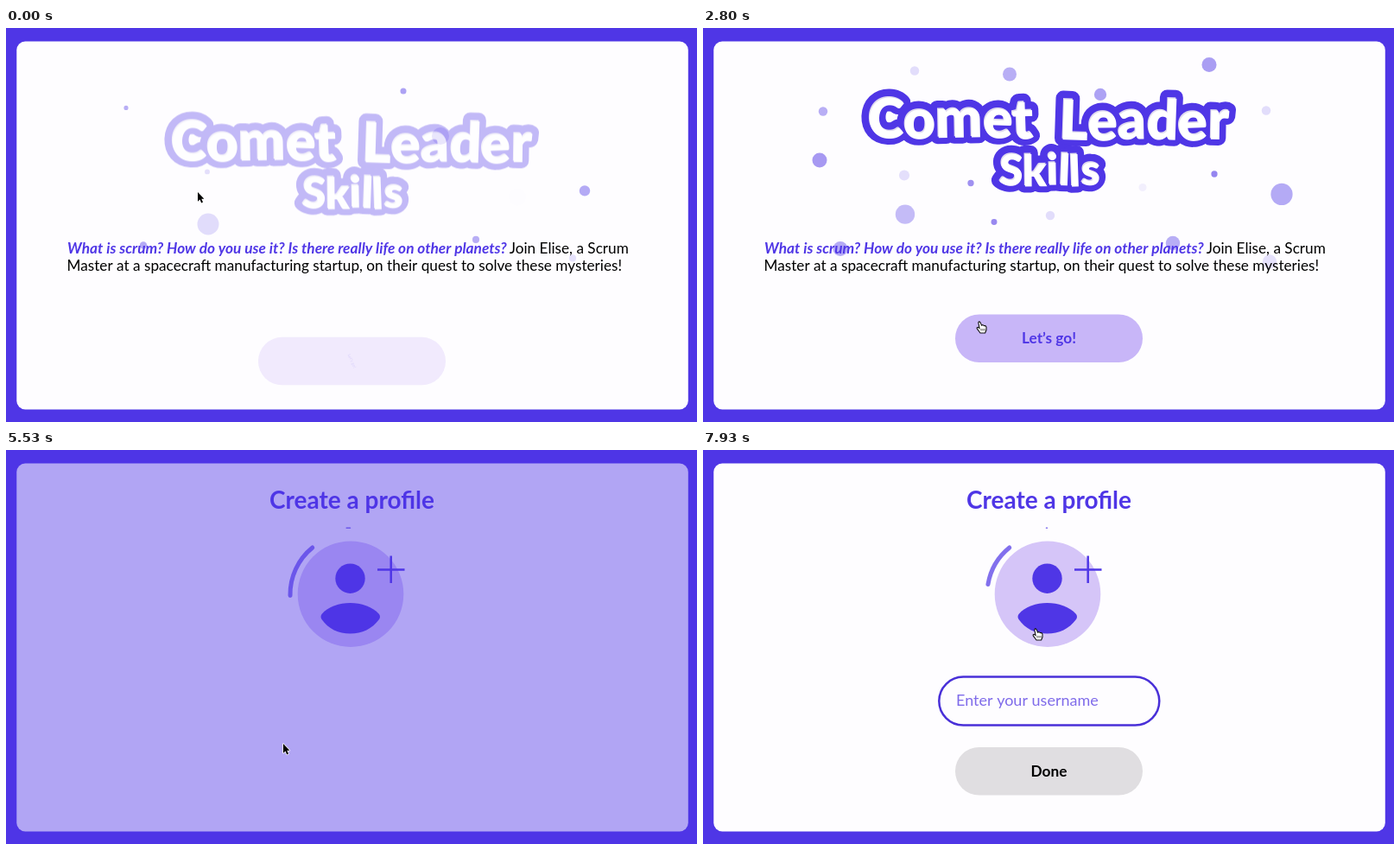
Recreate the animation shown at these times as an HTML page with a canvas. Size 800 by 456 pixels, loop 8000 ms.

```html
<!DOCTYPE html>
<html lang="en">
<head>
<meta charset="utf-8">
<title>Comet Leader Skills</title>
<style>
html, body { margin: 0; width: 100%; height: 100%; overflow: hidden; background: #4f36e6; }
canvas { display: block; width: 800px; height: 456px; }
</style>
</head>
<body>
<canvas id="stage" width="800" height="456"></canvas>
<script>
const LOOP = 8000;
const PURPLE = '#4f36e6', PAPER = '#fefdff', LILAC = '#d5c5f8';
const FONT = 'Lato, "Open Sans", sans-serif';
const ctx = document.getElementById('stage').getContext('2d');

const clamp = v => Math.min(1, Math.max(0, v));
const progress = (t, start, length) => clamp((t - start) / length);
const easeOut = p => 1 - (1 - p) ** 3;
const easeInOut = p => p * p * (3 - 2 * p);
const mix = (a, b, p) => a + (b - a) * p;
const rad = deg => deg * Math.PI / 180;

function group(draw, alpha = 1, x = 0, y = 0) {
  ctx.save();
  ctx.globalAlpha *= alpha;
  ctx.translate(x, y);
  draw();
  ctx.restore();
}

function disc(x, y, r, color) {
  ctx.fillStyle = color;
  ctx.beginPath();
  ctx.arc(x, y, Math.max(0, r), 0, Math.PI * 2);
  ctx.fill();
}

function pill(x, y, w, h, r) {
  ctx.beginPath();
  ctx.roundRect(x, y, w, h, r);
}

function write(text, x, y, style, color, align = 'left') {
  ctx.font = `${style} ${FONT}`;
  ctx.fillStyle = color;
  ctx.textAlign = align;
  ctx.fillText(text, x, y);
}

// Text that grows from nothing while turning upright around a centre.
function spinIn(cx, cy, p, draw) {
  ctx.save();
  ctx.translate(cx, cy);
  ctx.rotate(rad(90 * (1 - p)));
  ctx.scale(p, p);
  ctx.globalAlpha *= p;
  draw();
  ctx.restore();
}

function makeLogo() {
  const layer = document.createElement('canvas');
  layer.width = 800;
  layer.height = 240;
  const g = layer.getContext('2d');
  const words = [['Comet', 285, 126, 64], ['Leader', 509, 128, 64], ['Skills', 400, 181, 50]];
  const eachLetter = draw => words.forEach(([word, cx, base, size]) => {
    g.font = `900 ${size}px ${FONT}`;
    let x = cx - g.measureText(word).width / 2;
    [...word].forEach((letter, i) => {
      const w = g.measureText(letter).width;
      g.save();
      g.translate(x + w / 2, base + Math.sin(i * 2) * 1);
      g.rotate(rad(2.2 * Math.sin(i * 2.4 + 1)));
      draw(letter);
      g.restore();
      x += w;
    });
  });
  g.textAlign = 'center';
  g.lineJoin = 'round';
  g.lineWidth = 17;
  g.strokeStyle = PURPLE;
  eachLetter(c => g.strokeText(c, 0, 0));
  g.fillStyle = '#dfdaee';
  eachLetter(c => g.fillText(c, 0, 0));
  g.fillStyle = '#fff';
  eachLetter(c => g.fillText(c, 1, 1.5));
  return layer;
}
const logo = makeLogo();

// Bubbles fade in, rise and shrink. Each: x, y, radius, opacity.
const bubbleSets = [
  { phase: .9, period: 1500, full: .1, items: [
    [139, 117, 9.5, .4], [233, 191, 11, .15], [670, 213, 23, .42], [159, 276, 15.5, .42],
    [544, 269.5, 15, .4], [656, 291, 15, .14], [460, 97.5, 13, .46]] },
  { phase: 0, period: 1500, full: .2, items: [
    [245, 70, 15, .16], [355, 74, 23, .4], [586, 63, 24.5, .48], [652, 116, 15, .16],
    [135, 173.5, 24.5, .5], [310, 200, 10.5, .54], [509, 205, 13, .07], [592, 189.5, 10.5, .6],
    [402, 237.5, 15, .16], [337, 245, 10, .58], [340, 133, 10, .5]] },
  { phase: .1, period: 2045, full: .1, items: [[234, 227, 12.5, .33], [503, 125, 10, .36]] }
];

function drawBubbles(t) {
  for (const { phase, period, full, items } of bubbleSets) {
    const u = (phase + t / period) % 1;
    const rise = 24.6 * (u - full) / .8;
    for (const [x, y, r, alpha] of items) {
      group(() => disc(x, y - rise, r * (1 - u ** 3), PURPLE), alpha * clamp(u / .2));
    }
  }
}

function drawPanel() {
  ctx.fillStyle = PURPLE;
  ctx.fillRect(0, 0, 800, 456);
  ctx.fillStyle = PAPER;
  pill(12.3, 15.5, 777.5, 426, 10);
  ctx.fill();
}

function drawIntro(t) {
  drawPanel();
  drawBubbles(t);
  const enter = easeOut(progress(t, -90, 700));
  const drop = 40 * (1 - enter);
  group(() => ctx.drawImage(logo, 0, 0), enter, 0, drop);

  const lead = 'What is scrum? How do you use it? Is there really life on other planets?';
  write(lead, 71, 260.5, 'italic 700 17.3px', PURPLE);
  const next = 71 + ctx.measureText(lead).width + 3;
  write('Join Elise, a Scrum', next, 260.5, '17.2px', '#000');
  write('Master at a spacecraft manufacturing startup, on their quest to solve these mysteries!',
    70.5, 281, '17.2px', '#000');

  const hover = progress(t, 2430, 130);
  group(() => {
    ctx.fillStyle = `rgb(${mix(213, 200, hover)}, ${mix(197, 182, hover)}, 248)`;
    pill(292, 331.5, 217, 55.5, 27.7);
    ctx.fill();
    spinIn(400.5, 359, easeOut(progress(t, -70, 700)), () =>
      write('Let’s go!', 0, 6, '700 17.3px', PURPLE, 'center'));
  }, enter, 0, drop);
}

function drawRing(age) {
  if (age < 0) return;
  const arc = (r, from, lead, tail) => {
    if (lead <= tail) return;
    ctx.beginPath();
    ctx.arc(398.5, 167, r, rad(from - tail), rad(from - lead), true);
    ctx.stroke();
  };
  ctx.strokeStyle = PURPLE;
  ctx.lineCap = 'round';
  ctx.globalAlpha = .7;
  ctx.lineWidth = 5;
  arc(69.5, 231, Math.min(170, age * .305), Math.max(0, age - 270) * .305);
  if (age < 800) {
    ctx.lineWidth = 1.5;
    arc(76.8, 270, (age - 125) * .07, Math.max(0, age - 175) * .07);
  }
}

function drawAvatar() {
  disc(399, 166.7, 61.3, LILAC);
  disc(398.5, 148.7, 17.2, PURPLE);
  ctx.beginPath();
  ctx.moveTo(365.5, 190);
  ctx.bezierCurveTo(373, 181, 386, 177, 398.5, 177);
  ctx.bezierCurveTo(411, 177, 424, 181, 432, 190);
  ctx.quadraticCurveTo(434, 193, 432, 196);
  ctx.bezierCurveTo(424, 207, 412, 212.5, 398.5, 212.5);
  ctx.bezierCurveTo(385, 212.5, 373, 207, 365.5, 196);
  ctx.quadraticCurveTo(363.5, 193, 365.5, 190);
  ctx.fill();
  ctx.strokeStyle = PURPLE;
  ctx.lineWidth = 2.5;
  ctx.beginPath();
  ctx.moveTo(430, 138.5);
  ctx.lineTo(461.5, 138.5);
  ctx.moveTo(445.7, 122.5);
  ctx.lineTo(445.7, 154);
  ctx.stroke();
}

function drawProfile(t) {
  drawPanel();
  write('Create a profile', 400.5, 68, '700 28px', PURPLE, 'center');
  drawAvatar();
  group(() => drawRing(t < 7000 ? t - 5360 : t - 7795));

  const enter = easeOut(progress(t, 6330, 700));
  group(() => {
    ctx.strokeStyle = '#4930d8';
    ctx.lineWidth = 2.5;
    pill(273.3, 262.6, 255, 56, 28);
    ctx.stroke();
    spinIn(400.5, 290.5, easeOut(progress(t, 6460, 700)), () =>
      write('Enter your username', -107.5, 5.5, '18px', '#7f6bea'));
    ctx.fillStyle = '#e0dee1';
    pill(292, 344, 217, 55.5, 27.7);
    ctx.fill();
    write('Done', 400.5, 378, '700 17.3px', '#000', 'center');
  }, enter, 0, 40 * (1 - enter));
}

const arrowShape = new Path2D('M0 0V10.8L2.5 8.5 4.2 12.4 6 11.6 4.3 7.8H7.4Z');
const handShape = new Path2D('M-2.2 1Q-1.6-1 0 .6L1.6 4.2 3 3.6 4.4 4.6 6 4.6 7 6 7 9.5 5.6 13H0L-3.6 8.2Q-4.4 6.4-2.6 6.4L-.9 7.6Z');

function drawCursor(t) {
  const second = t >= 5200;
  const move = easeInOut(second ? progress(t, 7250, 530) : progress(t, 1930, 530));
  const x = second ? mix(321, 386, move) : mix(222, 321, move);
  const y = second ? mix(340, 207, move) : mix(190, 340, move);
  const hand = second ? t >= 7700 : t >= 2430;
  group(() => {
    ctx.lineJoin = 'round';
    if (hand) {
      ctx.fillStyle = '#fff';
      ctx.strokeStyle = '#111';
      ctx.lineWidth = 1.1;
      ctx.fill(handShape);
      ctx.stroke(handShape);
      ctx.beginPath();
      for (const fx of [1, 3, 5]) {
        ctx.moveTo(fx, 8);
        ctx.lineTo(fx, 10.5);
      }
      ctx.lineWidth = .7;
      ctx.stroke();
    } else {
      ctx.fillStyle = '#000';
      ctx.strokeStyle = '#fff';
      ctx.lineWidth = 1.4;
      ctx.stroke(arrowShape);
      ctx.fill(arrowShape);
    }
  }, 1, x, y);
}

function veil(alpha) {
  group(() => {
    ctx.fillStyle = PURPLE;
    ctx.fillRect(0, 0, 800, 456);
  }, alpha);
}

function frame() {
  const t = performance.now() % LOOP;
  if (t < 3600) {
    drawIntro(t);
    veil(easeInOut(progress(t, 2830, 500)));
  } else if (t < 5130) {
    ctx.fillStyle = PAPER;
    ctx.fillRect(0, 0, 800, 456);
  } else {
    drawProfile(t);
    veil(1 - easeOut(progress(t, 5360, 710)));
  }
  drawCursor(t);
  requestAnimationFrame(frame);
}
frame();
</script>
</body>
</html>
```
